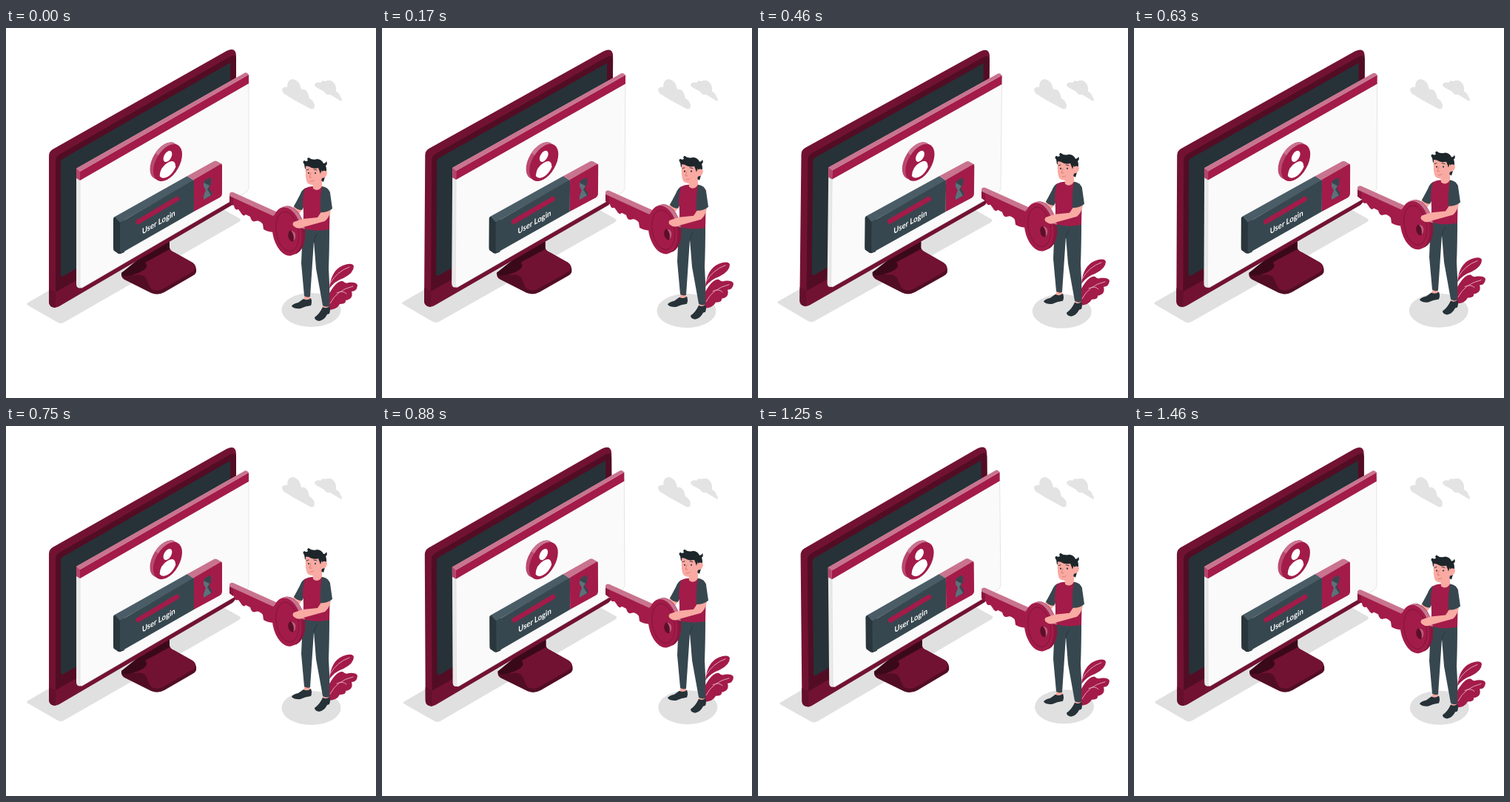
Write an HTML page that moves like this. It is 500 px wide and 500 px high and loops after 1500 ms.

```html
<!DOCTYPE html>
<html lang="en">
<head>
<meta charset="utf-8">
<title>User login</title>
<style>
  html, body { margin: 0; width: 100%; height: 100%; overflow: hidden; background: #fff; }
  svg { display: block; width: 100vw; height: 100vh; }
  .red { fill: #a31b49; }
  .pink { fill: #c9748f; }
  .wine { fill: #721232; }
  .deep { fill: #520d24; }
  .slate { fill: #37474f; }
  .ink { fill: #263238; }
  .skin { fill: #f9aaa2; }
  .grey { fill: #e0e0e0; }
  .line { fill: none; stroke-linecap: round; stroke-linejoin: round; }
</style>
</head>
<body>
<svg viewBox="0 0 500 500">
  <g fill="#e3e3e3">
    <path d="M373 83Q375 79 380 80Q380 69 388 69Q397 71 399 83Q405 82 408 88L410 95Q417 99 417 106Q416 111 411 109L389 97L376 89Q373 86 373 83Z"/>
    <path d="M417 76Q420 72 425 74Q427 70 432 72Q437 69 442 73Q447 78 446 86Q451 88 452 93Q455 97 453 99L438 90Q432 91 430 86L421 81Q417 79 417 76Z"/>
  </g>

  <g id="desk">
    <path class="grey" d="M30 371L270 232L315 257Q319 259 315 262L78 398Q74 400 70 398L30 375Q26 373 30 371Z"/>
    <ellipse class="grey" cx="412.500" cy="381" rx="40" ry="23"/>

    <!-- stand -->
    <path class="deep" d="M156 331L221 289V297Q222 301 227 303L252 317Q258 321 257 330Q256 333 252 335L214 357Q205 362 196 358L160 340Q155 337 156 331Z"/>
    <path class="wine" d="M157 331L221 289V297Q222 301 227 303L252 317Q259 322 253 329L213 352Q205 357 197 353Q194 351 190 339Q186 332 174 334Z"/>
    <path fill="#3a0919" d="M156 331L183 309L221 288V299L188 317Q195 324 179 331Q166 336 160 335Q156 335 156 331Z"/>

    <!-- monitor -->
    <path class="wine" d="M58 173Q58 167 63 164L298 31Q311 25 311 38V229Q311 235 306 239L72 376Q67 379 62 377Q58 375 58 370Z"/>
    <path class="deep" d="M67 180Q67 174 72 171L302 39Q311 34 311 43V218L67 357Z"/>
    <path fill="#64102c" d="M58 352L67 357V378Q58 377 58 370Z"/>
    <path class="ink" d="M74 182Q74 178 78 176L303 47V204L78 335Q74 337 74 333Z"/>

    <!-- window -->
    <path fill="#e9e9e9" d="M95 190L324 60L328 64V215Q328 219 324 222L102 351Q95 353 95 346Z"/>
    <path fill="#fafafa" stroke="#d9d9d9" stroke-width=".6" d="M100 194L328 64V215Q328 219 324 222L103 351Q100 352 100 348Z"/>
    <path class="red" d="M100 194L328 63V75L100 206Z"/>
    <path class="pink" d="M95 191Q95 189 98 188L322 61Q325 59 328 63L100 194Z"/>
    <path fill="#b5446b" d="M95 190L100 194V206L95 203Z"/>

    <!-- user badge -->
    <g transform="matrix(.866 -.5 0 1 214 179.500)">
      <circle r="22.500" fill="#b94a6f"/>
      <path class="pink" d="M-14 -17.600A22.500 22.500 0 0 1 18 -13L0 0Z"/>
    </g>
    <g transform="matrix(.866 -.5 0 1 218.500 182)">
      <circle r="22.500" class="red"/>
      <circle cy="-8.500" r="6.800" fill="#fff"/>
      <path fill="#fff" d="M-12.500 12Q-12 0 0 0Q12 0 12.500 12Q8 19 0 19Q-8 19 -12.500 12Z"/>
    </g>

    <!-- login button -->
    <path fill="#29363c" d="M145 258Q145 256 147 255L160 259V303L155 305Q152 306 149 303L146 301Q145 300 145 297Z"/>
    <path fill="#4a5d67" d="M147 255L245 200L254 206L154 263Z"/>
    <path class="slate" d="M154 265Q154 263 156 262L254 205V248L158 303Q154 305 154 301Z"/>
    <path class="pink" d="M245 200L281 180Q283 179 285 180L292 184L254 206Z"/>
    <path class="red" d="M254 205L290 184Q292 183 292 186V224Q292 227 289 229L254 248Z"/>
    <path class="slate" d="M267 210Q268 204 277 202V211L274 216L278 222V226L267 232V227L270 219L267 214Z"/>
    <path fill="#5d717b" d="M267 209L275 213L272 218L277 226L267 232V227L270 219L267 214Z"/>
    <path class="line" stroke="#a31b49" stroke-width="6.500" d="M178.500 262L231 231"/>
    <text transform="matrix(.866 -.5 0 1 184 279)" font-family="Lato, sans-serif" font-weight="700" font-size="11" fill="#fff">User Login</text>
  </g>

  <g id="man">
    <!-- plant -->
    <path class="red" d="M437 352Q439 328 455 321Q468 316 470 322Q470 331 456 338Q444 342 437 352Z"/>
    <path class="red" d="M435 381V362Q446 341 455 342Q459 346 463 344Q474 343 475 348Q474 356 467 356Q470 366 459 368Q460 373 451 373Q447 381 435 381Z"/>
    <path class="line" stroke="#e8b3c4" stroke-width=".9" d="M438 345Q447 329 464 323M438 372Q447 354 469 349M447 358Q455 354 460 359"/>

    <!-- legs -->
    <path class="skin" d="M403 360H411V369H403ZM428 372H437V380H428Z"/>
    <path class="ink" d="M402 366Q407 369 412 365Q414 370 412 375Q404 376 398 379Q390 380 386 376Q387 373 395 371ZM428 377Q433 380 437 376Q439 380 437 386L434 387Q430 395 423 396Q417 395 417 391Q424 386 428 377Z"/>
    <path class="slate" d="M402 268H437Q437 300 436 325Q438 350 437 376Q432 378 428 375L419 325L416 288L411 363Q407 365 403 362L399 318Q400 290 402 268Z"/>
    <path class="line" stroke="#263238" stroke-width=".8" d="M416 290Q417 282 421 278"/>

    <!-- far arm and torso -->
    <path class="skin" d="M391 237L401 244L393 256L380 261L377 252L385 248Z"/>
    <ellipse class="skin" cx="356" cy="249" rx="4" ry="3"/>
    <path class="slate" d="M405 216Q400 218 397 226L389 241Q393 246 400 246L405 236Z"/>
    <path class="red" d="M404 217Q408 214 415 214H427Q434 216 438 222L437 272Q420 276 401 271Q403 250 401 238Q401 226 404 217Z"/>
    <path class="skin" d="M414 205L427 204V214Q422 222 415 217Z"/>

    <!-- head -->
    <path fill="#1d262b" d="M403 184Q400 181 403 179Q406 181 408 179Q406 176 409 175Q413 179 421 177Q427 178 429 183Q432 183 433 180Q435 184 432 186Q434 191 432 198L429 208L424 205L404 190Z"/>
    <path class="skin" d="M405 187Q408 184 411 187Q418 191 425 188L427 194Q431 191 434 195Q434 202 427 203Q426 210 420 212Q411 213 407 209Q404 203 405 187Z"/>
    <path fill="#1d262b" d="M404 186Q412 182 422 184L427 190L425 197L422 189Q415 191 409 187Z"/>
    <circle class="ink" cx="409" cy="196" r="1.100"/>
    <circle class="ink" cx="418" cy="196" r="1.100"/>
    <path class="line" stroke="#263238" stroke-width=".9" d="M406 192L409 191M416 191L420 192"/>
    <path class="line" stroke="#d9736f" stroke-width=".8" d="M412 196L410 202L413 202M411 207Q414 208 416 206"/>

    <!-- key -->
    <path class="red" d="M303 223L364 250V276Q354 276 348 272L347 265Q342 259 337 261Q332 263 330 255L324 252Q321 256 317 249L314 245Q309 247 308 240L302 236Z"/>
    <path fill="#8a163d" d="M302 226L307 229L307 240L302 236Z"/>
    <path class="pink" d="M302 224Q303 221 307 222L367 249L361 254L302 227Z"/>
    <g transform="rotate(-10 380 274)">
      <ellipse fill="#8a163d" cx="384" cy="274" rx="20" ry="33"/>
      <path class="pink" d="M364 256Q371 239 386 241Q403 247 404 276L379 265Z"/>
      <ellipse class="red" cx="379.500" cy="275" rx="19.500" ry="33"/>
      <ellipse class="line" stroke="#7d1439" stroke-width=".9" cx="380" cy="275" rx="15" ry="27"/>
      <ellipse fill="#5c0e2a" cx="385" cy="282" rx="5" ry="7.500"/>
      <path fill="#c05a7d" d="M385 274.500Q391 277 390 283Q389 288 386 289Q389 282 385 274.500Z"/>
    </g>

    <!-- near arm -->
    <path class="skin" d="M427 247L439 246Q437 256 431 261L402 269Q395 273 389 268Q386 265 389 262L401 258L421 256Z"/>
    <path class="slate" d="M427 214Q436 215 438 223L441 244Q434 250 425 249Q424 232 427 214Z"/>
  </g>
</svg>
<script>
  const PERIOD = 1500, TILT = 0.8, LIFT = 10;
  const desk = document.getElementById('desk');
  const man = document.getElementById('man');

  // Linear triangle wave: 0 at whole turns, 1 at half turns.
  const triangle = p => 1 - Math.abs(1 - 2 * (p - Math.floor(p)));

  function draw(now) {
    const p = now / PERIOD;
    const tilt = TILT * (2 * triangle(p + 0.25) - 1);
    desk.setAttribute('transform', `rotate(${tilt} 238 217)`);
    man.setAttribute('transform', `translate(0 ${-LIFT * triangle(p)})`);
    requestAnimationFrame(() => draw(performance.now()));
  }
  draw(0);
</script>
</body>
</html>
```
